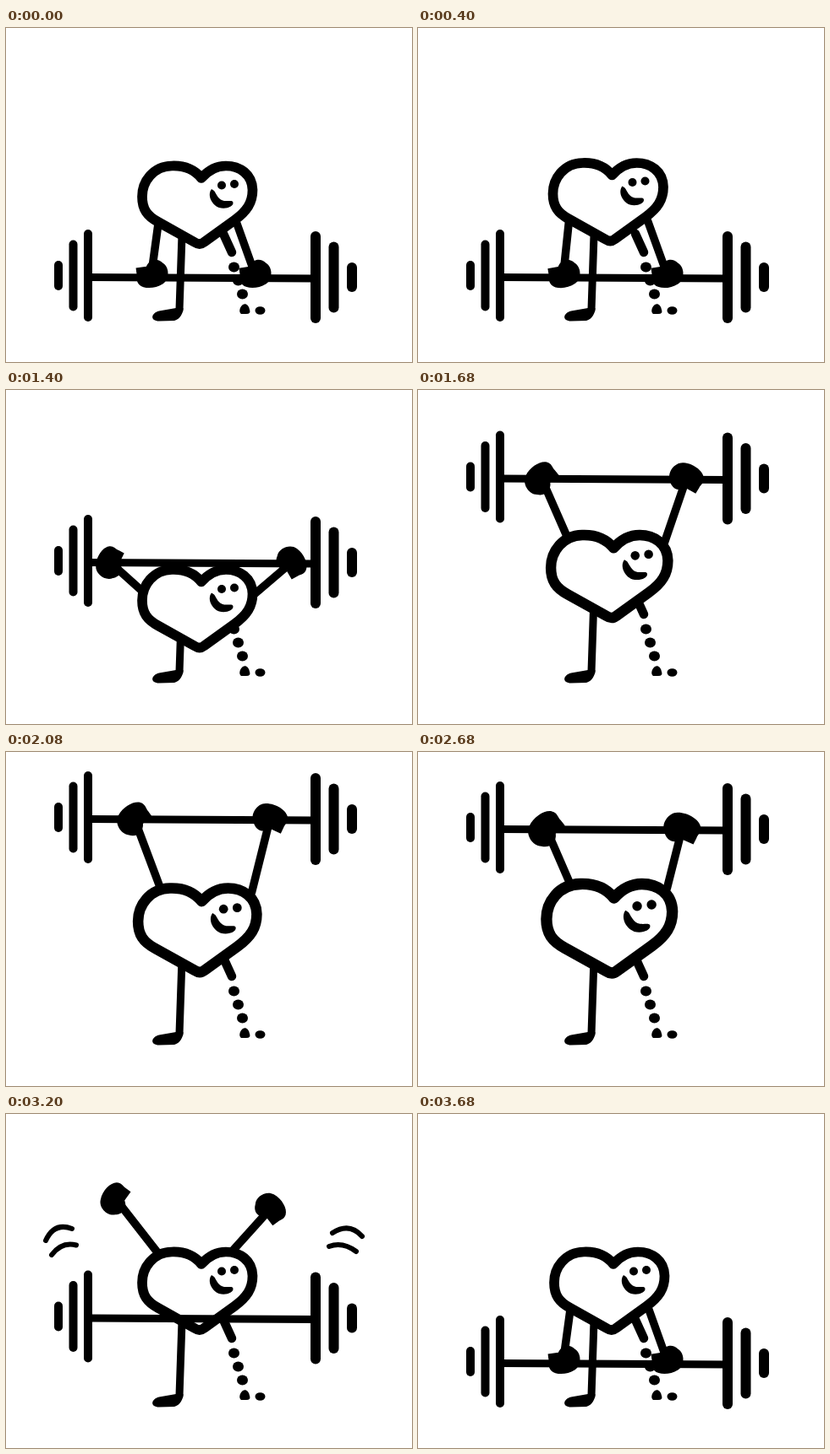
Write an HTML page with a canvas that moves like this. It is 480 px wide and 396 px high and loops after 3.72 s.

```html
<!DOCTYPE html>
<html lang="en">
<head>
<meta charset="utf-8">
<title>Heart lifting a barbell</title>
<style>
  html, body { margin: 0; width: 100%; height: 100%; overflow: hidden; background: #fff; }
  canvas { display: block; }
</style>
</head>
<body>
<canvas id="stage" width="480" height="396"></canvas>
<script>
const ctx = document.getElementById('stage').getContext('2d');
const LOOP = 3720, STEP = 40, RELEASE = 2800, IMPACT = 3270;

const heartShape = new Path2D('M231 178C222 167 209 163 196 163.5C174 164 161 182 161 200C161 215 167 223 180 230L223 254Q229 258 234 254L270 228C285 217 291.5 207 291.5 192C291 173 276 163.5 260 163.5C247 163.5 238 170 231 178Z');
const smile = new Path2D('M243 191C238 197 242 209 252 213C260 215 269 212 268.5 207C268 204 264 205.5 258 205C251 204 249 197 246 193Z');
const handShape = new Path2D('M-18 -6L-6 -8C-2 -17 7 -18 13 -12C21 -7 21 7 13 12C4 18 -9 18 -14 13C-18 9 -16 5 -17 1Z');
const foot = new Path2D('M201 332L181 335.5C171 338 170 347.5 181 347.5L199 347C206 345 209.5 338 209.5 332Z');
const heel = new Path2D('M280 328C283 326 287 328 288 334Q290 339 284 339L278 339C275 337 276 331 280 328Z');
const swishes = new Path2D('M47 150Q57 128 78 136M54 167Q66 151 83 155.5M386 141Q406 128 421 145M382 157Q398 151 414 163');

// Arm poses: shoulder offset from the heart's centre, then the hand's place
const leftArm = {
  grip: [-46, 22, 172, 291], rack: [-66, -22, 124, 204],
  overhead: [-41, -48, 152, 102], thrown: [-47, -46, 130, 101], restAngle: 83
};
const rightArm = {
  grip: [47, 22, 294, 291], rack: [66, -16, 337, 204],
  overhead: [60, -42, 312, 102], thrown: [42, -48, 312, 113], restAngle: 110
};

const progress = (t, from, to) => Math.min(1, Math.max(0, (t - from) / (to - from)));
const smooth = u => u * u * (3 - 2 * u);
const easeOut = u => 1 - (1 - u) ** 3;
const mix = (a, b, u) => a.map((v, i) => v + (b[i] - v) * u);

const strain = t => smooth(progress(t, 0, 800));
const clean = t => progress(t, 920, 1400);
const press = t => easeOut(progress(t, 1400, 2080));
const hold = t => smooth(progress(t, 2080, 2680));
const recover = t => smooth(progress(t, RELEASE, 3000));

function liftAt(t) {
  if (t >= IMPACT) return 7 * Math.sin(Math.PI * progress(t, IMPACT, 3440));
  if (t >= RELEASE) return 194 * (1 - progress(t, RELEASE, IMPACT) ** 2);
  const stretch = smooth(progress(t, 2080, 2200)), sag = progress(t, 2200, RELEASE) ** 2;
  return 91 * clean(t) + 125 * press(t) + 6 * stretch - 28 * sag;
}

function heartAt(t) {
  return {
    x: 226 - 3 * strain(t) * (1 - clean(t)),
    y: 210 - 7 * strain(t) + 56.5 * clean(t) - 48 * press(t) - 2 * hold(t) + 0.5 * recover(t),
    scale: 1 + 0.075 * press(t) + 0.065 * hold(t) - 0.14 * recover(t)
  };
}

function armPose(arm, t) {
  let pose = mix(arm.grip, arm.rack, clean(t));
  pose = mix(pose, arm.overhead, press(t));
  pose = mix(pose, arm.thrown, smooth(progress(t, RELEASE, 3120)));
  pose = mix(pose, arm.rack, progress(t, 3360, 3520));
  return mix(pose, arm.grip, progress(t, 3520, 3680));
}

function line(x1, y1, x2, y2, width) {
  ctx.lineWidth = width;
  ctx.beginPath();
  ctx.moveTo(x1, y1);
  ctx.lineTo(x2, y2);
  ctx.stroke();
}

function dot(x, y, rx, ry = rx) {
  ctx.beginPath();
  ctx.ellipse(x, y, rx, ry, 0, 0, 2 * Math.PI);
  ctx.fill();
}

function drawLegs() {
  line(208, 246, 205, 334, 9);
  ctx.fill(foot);
  line(257, 244, 267, 266, 10.5);
  for (let i = 0; i < 3; i++) dot(269.5 + 5 * i, 283.5 + 16 * i, 6.5, 6);
  ctx.fill(heel);
  dot(300.5, 335, 6, 4.8);
}

function drawHeart({ x, y, scale }) {
  ctx.save();
  ctx.translate(x, y);
  ctx.scale(scale, scale);
  ctx.translate(-226, -210);
  ctx.fillStyle = '#fff';
  ctx.fill(heartShape);
  ctx.lineWidth = 11.7;
  ctx.stroke(heartShape);
  ctx.fillStyle = '#000';
  dot(255, 186.5, 5);
  dot(270, 185, 5);
  ctx.fill(smile);
  ctx.restore();
}

function drawBarbell(lift) {
  ctx.save();
  ctx.translate(0, -lift);
  line(97, 295.5, 365, 297, 9);
  for (const side of [-1, 1]) {
    const y = 294.5 + side, width = 11 + side;
    [109, 84, 35].forEach((height, i) => {
      const x = 231.5 + side * 134.5 + i * (2 + side * 19.5);
      const reach = (height - width) / 2;
      line(x, y - reach, x, y + reach, width);
    });
  }
  ctx.restore();
}

function drawHand({ sx, sy, hx, hy, restAngle }, size) {
  ctx.save();
  ctx.translate(hx, hy);
  ctx.rotate(Math.atan2(sy - hy, sx - hx) + restAngle * Math.PI / 180);
  ctx.scale(size, size);
  ctx.fill(handShape);
  ctx.restore();
}

function draw(t) {
  ctx.fillStyle = '#fff';
  ctx.fillRect(0, 0, 480, 396);
  ctx.fillStyle = ctx.strokeStyle = '#000';
  ctx.lineCap = ctx.lineJoin = 'round';

  const lift = liftAt(t), heart = heartAt(t);
  const grip = 291 - lift + 5 * clean(t);
  const arms = [leftArm, rightArm].map(arm => {
    const [dx, dy, hx, hy] = armPose(arm, t);
    return {
      sx: heart.x + dx * heart.scale, sy: heart.y + dy * heart.scale,
      hx, hy: t < RELEASE ? grip : hy, restAngle: arm.restAngle
    };
  });

  drawLegs();
  for (const { sx, sy, hx, hy } of arms) line(sx, sy, hx, hy, 9.5);
  drawHeart(heart);
  drawBarbell(lift);
  for (const arm of arms) drawHand(arm, 1.03 * heart.scale);
  if (t >= 3000 && t < 3320) {
    ctx.lineWidth = 6;
    ctx.stroke(swishes);
  }
}

function tick() {
  const t = performance.now() % LOOP;
  draw(Math.floor(t / STEP) * STEP);
  requestAnimationFrame(tick);
}
tick();
</script>
</body>
</html>
```
